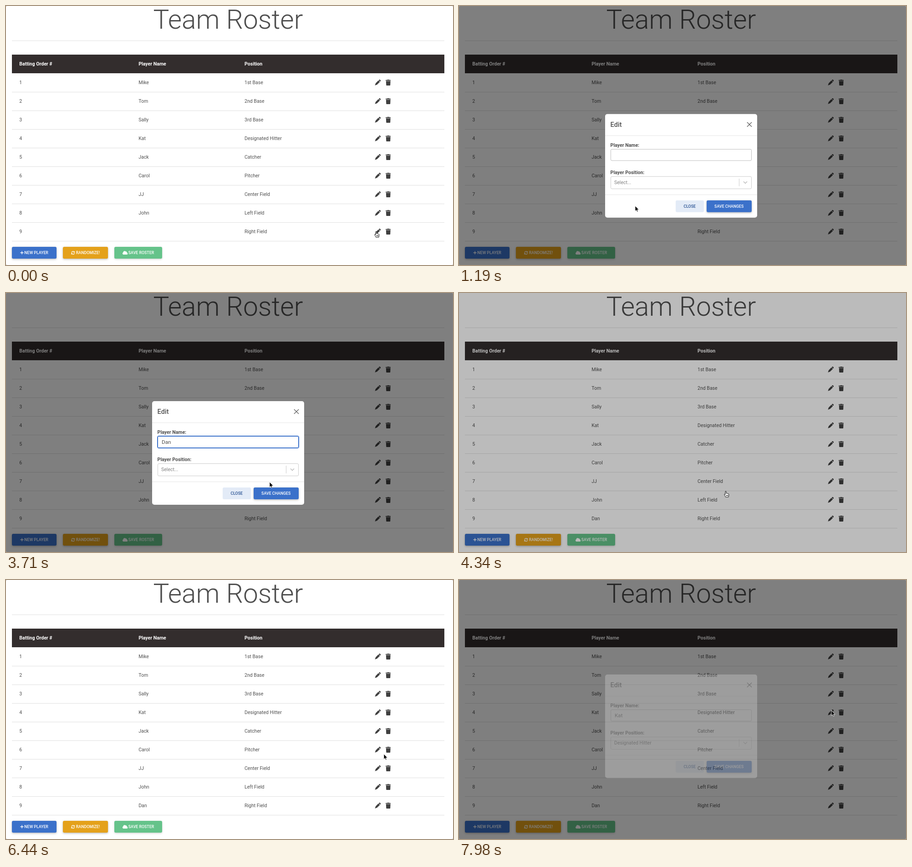
An HTML page that plays this animation: 982x570 px, repeating every 8000 ms.

```html
<!DOCTYPE html>
<html lang="en">
<head>
<meta charset="utf-8">
<title>Team Roster</title>
<style>
  html, body { margin: 0; width: 100%; height: 100%; overflow: hidden; background: #999; }
  #stage { position: absolute; left: 0; top: 0; width: 982px; height: 570px; overflow: hidden; border-radius: 2px;
    background: #fff; color: #4f4f4f; font: 10.55px/20px Roboto, sans-serif; }
  #stage div, #stage svg { position: absolute; box-sizing: border-box; }
  .t { white-space: pre; height: 20px; }
  .b { font-weight: 700; }
  .title { left: 0; width: 976px; top: -10.4px; text-align: center; font-size: 58.6px; line-height: 80px; font-weight: 300; }
  .line { left: 13px; width: 950px; height: 1px; background: #e0e0e0; }
  .head { left: 13px; top: 107px; width: 950px; height: 41px; background: #332d2d; }
  .btn { height: 26.4px; border-radius: 3px; font-size: 8.8px; font-weight: 500; line-height: 26.8px; color: #fff;
    white-space: pre; box-shadow: 0 1.5px 3.7px rgba(0,0,0,.2), 0 1.5px 7px rgba(0,0,0,.1); }
  .icon { fill: #404040; }
  .btn svg { fill: #fff; }
  #shade { inset: 0; background: #000; }
  #modal { left: 321px; top: 238px; width: 334px; height: 227.5px; border-radius: 5px; background: #fff; }
  .rule { left: 0; width: 334px; height: 1px; background: #e6e6e6; }
  .field { left: 12px; width: 310px; border-radius: 3px; border: 1px solid #bdbdbd; }
  #name { top: 76.5px; height: 26.5px; font-size: 11.73px; padding-left: 8px; line-height: 24.5px; }
  #name.focus { border-color: #3b71ca; box-shadow: 0 0 0 1px #3b71ca; }
  #pick { top: 136.5px; height: 28px; border-color: #ccc; padding-left: 7px; line-height: 26px; }
  .stroke { fill: none; }
</style>
</head>
<body>
<svg width="0" height="0" style="position:absolute">
  <symbol id="pencil" viewBox="0 0 16 16"><g transform="rotate(45 8 8)">
    <rect x="5.300" y="-1.800" width="5.400" height="3.400" rx="1"/><path d="M5.300 2.600H10.700V13L8 18.500 5.300 13Z"/></g></symbol>
  <symbol id="trash" viewBox="0 0 14 16"><rect y="1" width="14" height="2" rx=".5"/><rect x="4" width="6" height="2" rx="1"/>
    <path d="M1 4H13L12.400 14.600Q12.300 16 10.900 16H3.100Q1.700 16 1.600 14.600Z"/></symbol>
  <symbol id="plus" viewBox="0 0 16 16"><path d="M8 1V15M1 8H15" stroke="#fff" stroke-width="2.600"/></symbol>
  <symbol id="sync" viewBox="0 0 16 16"><path d="M2 7A6.200 6.200 0 0 1 12.800 4.200M14 9A6.200 6.200 0 0 1 3.200 11.800" fill="none" stroke="#fff" stroke-width="2.300"/><path d="M15.500.5V7H9ZM.5 15.500V9H7Z"/></symbol>
  <symbol id="cloud" viewBox="0 0 20 14"><circle cx="4.500" cy="9.500" r="4.500"/><circle cx="8" cy="5" r="5"/>
    <circle cx="13.500" cy="5.200" r="3.200"/><circle cx="16" cy="10" r="4"/><rect x="4" y="7" width="12" height="7"/></symbol>
</svg>
<div id="stage"></div>
<script>
const $ = id => document.getElementById(id);
const stage = $('stage');

const html = (parent, markup) => parent.insertAdjacentHTML('beforeend', markup);
const text = (parent, x, cy, str, cls = '', style = '') =>
  html(parent, `<div class="t ${cls}" style="left:${x}px;top:${cy - 10}px;${style}">${str}</div>`);
const icon = (id, x, y, w, h) =>
  `<svg class="icon" style="left:${x}px;top:${y}px" width="${w}" height="${h}"><use href="#${id}"/></svg>`;
const button = (parent, x, y, w, bg, label, pad, extra = '', inner = '') =>
  html(parent, `<div class="btn" style="left:${x}px;top:${y}px;width:${w}px;background:${bg};padding-left:${pad}px;
    ${extra}">${inner}${label}</div>`);

// Page
const COLS = [29.3, 291.2, 524];
const ROW = 41.06;
const rowY = n => 127.6 + n * ROW;
const players = ['Mike,1st Base', 'Tom,2nd Base', 'Sally,3rd Base', 'Kat,Designated Hitter', 'Jack,Catcher',
  'Carol,Pitcher', 'JJ,Center Field', 'John,Left Field', ',Right Field'];

html(stage, '<div class="title">Team Roster</div><div class="line" style="top:76px"></div><div class="head"></div>');
['Batting Order #', 'Player Name', 'Position'].forEach((s, i) => text(stage, COLS[i], 128, s, 'b', 'color:#fff'));
players.forEach((player, i) => {
  const cy = rowY(i + 1);
  [i + 1, ...player.split(',')].forEach((s, c) => text(stage, COLS[c], cy, s, c === 1 ? 'player' : ''));
  html(stage, icon('pencil', 809.8, cy - 6.7, 13.2, 13.2) + icon('trash', 833.6, cy - 6.9, 11.5, 13.2) +
    `<div class="line" style="top:${Math.round(cy + 19.9)}px"></div>`);
});
const lastName = [...stage.querySelectorAll('.player')].pop();

button(stage, 13, 530, 98, '#3b71ca', 'NEW PLAYER', 27.2, '', icon('plus', 17.6, 9.2, 8, 8));
button(stage, 125, 530, 99, '#e4a11b', 'RANDOMIZE!', 28.8, '', icon('sync', 17.8, 9, 8.6, 8.6));
button(stage, 238, 530, 105, '#14a44d', 'SAVE ROSTER', 30.8, 'opacity:.65', icon('cloud', 17.8, 9, 11.4, 8.4));

// Dialog
html(stage, '<div id="shade"></div><div id="modal"></div>');
const shade = $('shade'), modal = $('modal');
text(modal, 11.6, 23.3, 'Edit', '', 'font-size:14.66px;font-weight:500');
html(modal, `<svg class="stroke" style="left:311px;top:17px" width="12" height="12" stroke="#666" stroke-width="1.4">
    <path d="M.9.9 11.1 11.1M11.1.9.9 11.1"/></svg>
  <div class="rule" style="top:47px"></div><div class="rule" style="top:176.5px"></div>`);
text(modal, 11.6, 68.5, 'Player Name:', 'b');
html(modal, '<div id="name" class="field"></div>');
text(modal, 11.6, 128.5, 'Player Position:', 'b');
html(modal, `<div id="pick" class="field"></div>
  <svg class="stroke" style="left:293px;top:142px" width="24" height="17">
    <path d="M1.5 0V17" stroke="#ccc"/><path d="M11 6.5 15 10.5 19 6.5" stroke="#bbb" stroke-width="1.5"/></svg>`);
button(modal, 155, 189.8, 62, '#e3ebf7', 'CLOSE', 17.4, 'color:#285192;box-shadow:none');
button(modal, 222.6, 189.8, 99.4, '#3b71ca', 'SAVE CHANGES', 17.5);
const nameBox = $('name'), pick = $('pick');

// Pointer shapes, each with its hot spot at 0,0
html(stage, `<svg id="pointer" style="left:0;top:0;overflow:visible" width="1" height="1">
  <path id="arrow" d="M0 0V11.500L2.600 9.100 4.300 13 6.200 12.200 4.500 8.400H8.100Z" fill="#000" stroke="#fff" stroke-width=".8"/>
  <path id="hand" d="M-1 .8Q0-.6 1.100.8V5Q2.300 4.200 3.100 5.300 4.300 4.700 5 5.800 6.800 5.500 6.800 7.200V9.500L5.800 13.200H-.2L-2.800 8.300Q-3.800 6.800-2.700 6.500-1.900 6.400-1 7.700ZM1.200 8.500V11M3 8.500V11M4.700 8.500V11" fill="#fff" stroke="#000" stroke-width=".9" stroke-linejoin="round"/>
  <path id="beam" d="M-2.500-6.500H2.500M0-6.500V6.500M-2.500 6.500H2.500" fill="none" stroke="#222"/>
</svg>`);
const pointer = $('pointer'), shapes = ['arrow', 'hand', 'beam'].map($);

// Story
const LOOP = 8000, TICK = 70;
const OPEN = 740, FOCUS = 2100, TYPE = 2450, SAVE = 3920, REOPEN = 7750;
const SHADE_MS = 150, SLIDE_MS = 300, ALPHA_MS = 200, LAG = 200;
const CLOSED = SAVE + 2 * SLIDE_MS - 100;

// Pointer journeys: start, end, x, y
const START = [813, 496];
const MOVES = [
  [70, 560, 818, 497],
  [910, 1190, 387, 440],
  [1400, FOCUS, 415, 326],
  [2590, 3710, 579, 416],
  [3710, 3850, 586, 436],
  [5180, 5950, 669, 389],
  [6160, 6440, 830, 383],
  [6440, 7490, 818, 287],
];

const ramp = (t, from, ms) => Math.min(1, Math.max(0, (t - from) / ms));
const easeOut = p => 1 - (1 - p) ** 3;
const smooth = p => p * p * (3 - 2 * p);
// 0 to 1 when the dialog opens, back to 0 when it closes, then up again
const toggle = (t, open, close, reopen, ms, ease = p => p) =>
  ease(ramp(t, open, ms)) - ease(ramp(t, close, ms)) + ease(ramp(t, reopen, ms));

function pointerAt(t) {
  let [x, y] = START;
  for (const [from, to, tx, ty] of MOVES) {
    const p = smooth(ramp(t, from, to - from));
    x += (tx - x) * p;
    y += (ty - y) * p;
  }
  return [x, y];
}

const inside = (x, y, l, t, r, b) => x >= l && x <= r && y >= t && y <= b;
function shapeAt(t, x, y) {
  if (t >= TYPE && t < MOVES[3][0]) return '';
  if (t >= OPEN && t < CLOSED) {
    if (inside(x, y, 333, 314, 643, 341)) return 'beam';
    return inside(x, y, 544, 428, 643, 454) ? 'hand' : 'arrow';
  }
  const nearRow = Math.abs(y - rowY(Math.round((y - rowY(0)) / ROW))) < 7;
  const onIcon = inside(x, y, 810, 160, 823, 510) || inside(x, y, 834, 160, 845, 510);
  return t < REOPEN && nearRow && onIcon ? 'hand' : 'arrow';
}

const start = performance.now();
function draw(now) {
  const ms = Math.max(0, now - start) % LOOP;
  const t = Math.floor(ms / TICK) * TICK;
  const second = t >= CLOSED;

  shade.style.opacity = .5 * toggle(t, OPEN, CLOSED - SHADE_MS, REOPEN, SHADE_MS);
  const times = [OPEN + LAG, SAVE, REOPEN + LAG - 17];
  modal.style.opacity = toggle(t, ...times, ALPHA_MS);
  modal.style.transform = `translateY(${-50 * (1 - toggle(t, ...times, SLIDE_MS, easeOut))}px)`;

  const typed = t < TYPE ? 0 : 1 + Math.floor((t - TYPE) / 150);
  nameBox.textContent = second ? 'Kat' : 'Dan'.slice(0, typed);
  nameBox.classList.toggle('focus', t >= FOCUS && !second);
  pick.textContent = second ? 'Designated Hitter' : 'Select...';
  pick.style.color = second ? '#4f4f4f' : '#808080';
  lastName.textContent = t < SAVE ? '' : 'Dan';

  const [x, y] = pointerAt(t), shape = shapeAt(t, x, y);
  pointer.style.transform = `translate(${x}px,${y}px)`;
  shapes.forEach(s => s.style.display = s.id === shape ? '' : 'none');
  requestAnimationFrame(draw);
}
draw(start);
</script>
</body>
</html>
```
